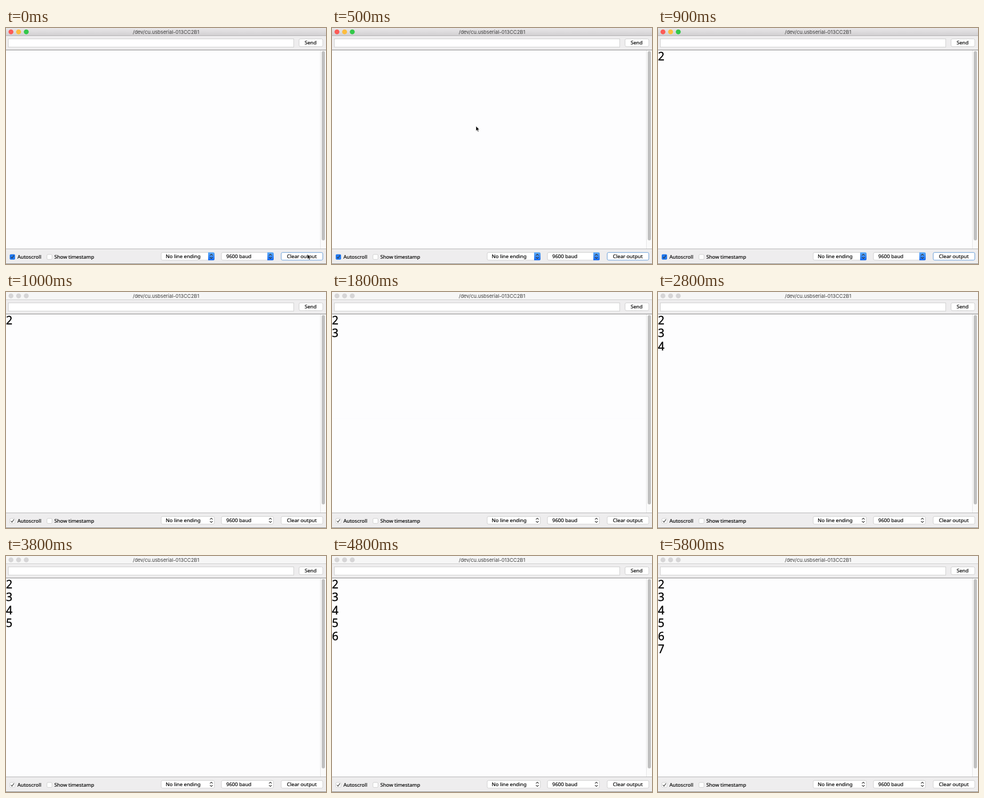
Write an HTML page that moves like this. It is 600x445 px and loops after 6000 ms.

```html
<!DOCTYPE html>
<html lang="en">
<head>
<meta charset="utf-8">
<title>Serial monitor</title>
<style>
  html, body { margin: 0; width: 100%; height: 100%; overflow: hidden; background: #eee; }
  svg { display: block; width: 600px; height: 445px; }
  text { font: 9.5px "Noto Sans", sans-serif; fill: #000; stroke: #000; stroke-width: .2px; white-space: pre; }
  .mid { text-anchor: middle; }
  .title { font: 9.3px Inter, sans-serif; fill: #3c3c3c; stroke: none; }
  .out text { font-size: 21px; stroke-width: .35px; }
  .box { fill: #fff; stroke: #c6c6c6; stroke-width: .8; }
  .chev { fill: none; stroke: #333; stroke-width: 1.1; stroke-linecap: round; stroke-linejoin: round; }
  .active .chev, .press text { stroke: #fff; }
  .press text { fill: #fff; }

  .active, .press, .cover, .cursor { animation: 6s step-end infinite; }
  .active { animation-name: active; }
  .press { animation-name: press; }
  .cover { animation-name: reveal; }
  .cursor { animation-name: move; }

  @keyframes active { 0% { visibility: visible } 16.6667%, 100% { visibility: hidden } }
  @keyframes press { 0% { visibility: hidden } 1.6667% { visibility: visible } 5%, 100% { visibility: hidden } }
  @keyframes reveal {
    0% { transform: translateY(0) }
    13.3333% { transform: translateY(24.4px) }
    30% { transform: translateY(48.8px) }
    46.6667% { transform: translateY(73.2px) }
    63.3333% { transform: translateY(97.6px) }
    80% { transform: translateY(122px) }
    96.6667%, 100% { transform: translateY(146.4px) }
  }
  @keyframes move {
    0% { transform: translate(565px, 426.5px); visibility: visible }
    5% { transform: translate(540px, 405px) }
    6.6667% { transform: translate(440px, 320px) }
    8.3333% { transform: translate(270px, 185px) }
    10% { transform: translate(110px, 65px) }
    11.6667% { transform: translate(15px, 4px) }
    13.3333%, 100% { transform: translate(15px, 4px); visibility: hidden }
  }
</style>
</head>
<body>
<svg viewBox="0 0 600 445">
  <defs>
    <linearGradient id="bar" x2="0" y2="1"><stop stop-color="#e9e7e9"/><stop offset="1" stop-color="#d2d0d2"/></linearGradient>
    <linearGradient id="blue" x2="0" y2="1"><stop stop-color="#62aef9"/><stop offset="1" stop-color="#1368f0"/></linearGradient>
    <path id="arrows" class="chev" d="M-2.3-1.8 0-4 2.3-1.8M-2.3 1.8 0 4 2.3 1.8"/>
    <path id="tick" class="chev" d="M-2.5 .3-.8 2.5 2.6-2.6"/>
    <g id="lights"><circle cx="9.3" cy="7.3" r="4.6"/><circle cx="23.6" cy="7.3" r="4.6"/><circle cx="38" cy="7.3" r="4.6"/></g>
  </defs>

  <rect width="600" height="445" fill="#eeedee"/>
  <rect width="600" height="14" fill="#f6f6f6"/>
  <use href="#lights" fill="#d6d5d6"/>
  <rect y="14" width="600" height="1" fill="#cfcfcf"/>

  <rect class="box" x="4.5" y="20.5" width="535" height="15.5"/>
  <rect class="box" x="549.5" y="20.5" width="44.5" height="14.5" rx="2.5"/>
  <text class="mid" x="571.2" y="31">Send</text>

  <rect y="41" width="600" height="376" fill="#fdfdfe"/>
  <g class="out">
    <text x="0" y="61">2</text>
    <text x="0" y="85.4">3</text>
    <text x="0" y="109.8">4</text>
    <text x="0" y="134.2">5</text>
    <text x="0" y="158.6">6</text>
    <text x="0" y="183">7</text>
  </g>
  <rect class="cover" y="42" width="588" height="148" fill="#fdfdfe"/>
  <rect y="41" width="600" height="1" fill="#858585"/>
  <rect x="589" y="42" width="11" height="374" fill="#fafafa"/>
  <rect x="589" y="42" width="1" height="374" fill="#e5e5e5"/>
  <rect x="592" y="43.5" width="6" height="357" rx="3" fill="#c0c0c0"/>
  <rect y="416" width="600" height="1" fill="#b4b4b4"/>
  <rect y="444" width="600" height="1" fill="#8c8c8c"/>

  <rect class="box" x="7.3" y="427" width="9.4" height="9.4" rx="2"/>
  <use href="#tick" x="12" y="431.7"/>
  <text x="21.5" y="435">Autoscroll</text>
  <rect class="box" x="76.8" y="427" width="9.4" height="9.4" rx="2"/>
  <text x="90.5" y="435">Show timestamp</text>

  <rect class="box" x="291" y="423.3" width="99.7" height="14.4" rx="2.5"/>
  <text x="299.5" y="433.6">No line ending</text>
  <use href="#arrows" x="385" y="430.5"/>
  <rect class="box" x="404" y="423.3" width="97.5" height="14.4" rx="2.5"/>
  <text x="413" y="433.6">9600 baud</text>
  <use href="#arrows" x="495.7" y="430.5"/>
  <rect class="box" x="516" y="423.3" width="78" height="14.4" rx="2.5"/>
  <text class="mid" x="554.7" y="433.6">Clear output</text>

  <g class="active">
    <rect width="600" height="14" fill="url(#bar)"/>
    <rect y="14" width="600" height="1" fill="#b3b1b3"/>
    <circle cx="9.3" cy="7.3" r="4.6" fill="#fc5b57"/>
    <circle cx="23.6" cy="7.3" r="4.6" fill="#fdbd3f"/>
    <circle cx="38" cy="7.3" r="4.6" fill="#34c84a"/>
    <rect x="7" y="426.7" width="10" height="10" rx="2" fill="#2079f2"/>
    <use href="#tick" x="12" y="431.7"/>
    <path d="M379 423h9.5a2.5 2.5 0 0 1 2.5 2.5v10a2.5 2.5 0 0 1-2.5 2.5H379z" fill="url(#blue)"/>
    <use href="#arrows" x="385" y="430.5"/>
    <path d="M490 423h9.5a2.5 2.5 0 0 1 2.5 2.5v10a2.5 2.5 0 0 1-2.5 2.5H490z" fill="url(#blue)"/>
    <use href="#arrows" x="495.7" y="430.5"/>
    <rect x="516" y="423.3" width="78" height="14.4" rx="2.5" fill="none" stroke="#74aae6"/>
  </g>
  <text class="title mid" x="300" y="10.6">/dev/cu.usbserial-013CC2B1</text>

  <g class="press">
    <rect x="515.8" y="423" width="78.4" height="15" rx="2.5" fill="url(#blue)"/>
    <text class="mid" x="554.7" y="433.6">Clear output</text>
  </g>
  <path class="cursor" d="M0 0v9.2l2.1-2 1.5 3.4 1.5-.7-1.5-3.2h2.8z" fill="#000" stroke="#fff" stroke-width=".6"/>
</svg>
</body>
</html>
```
